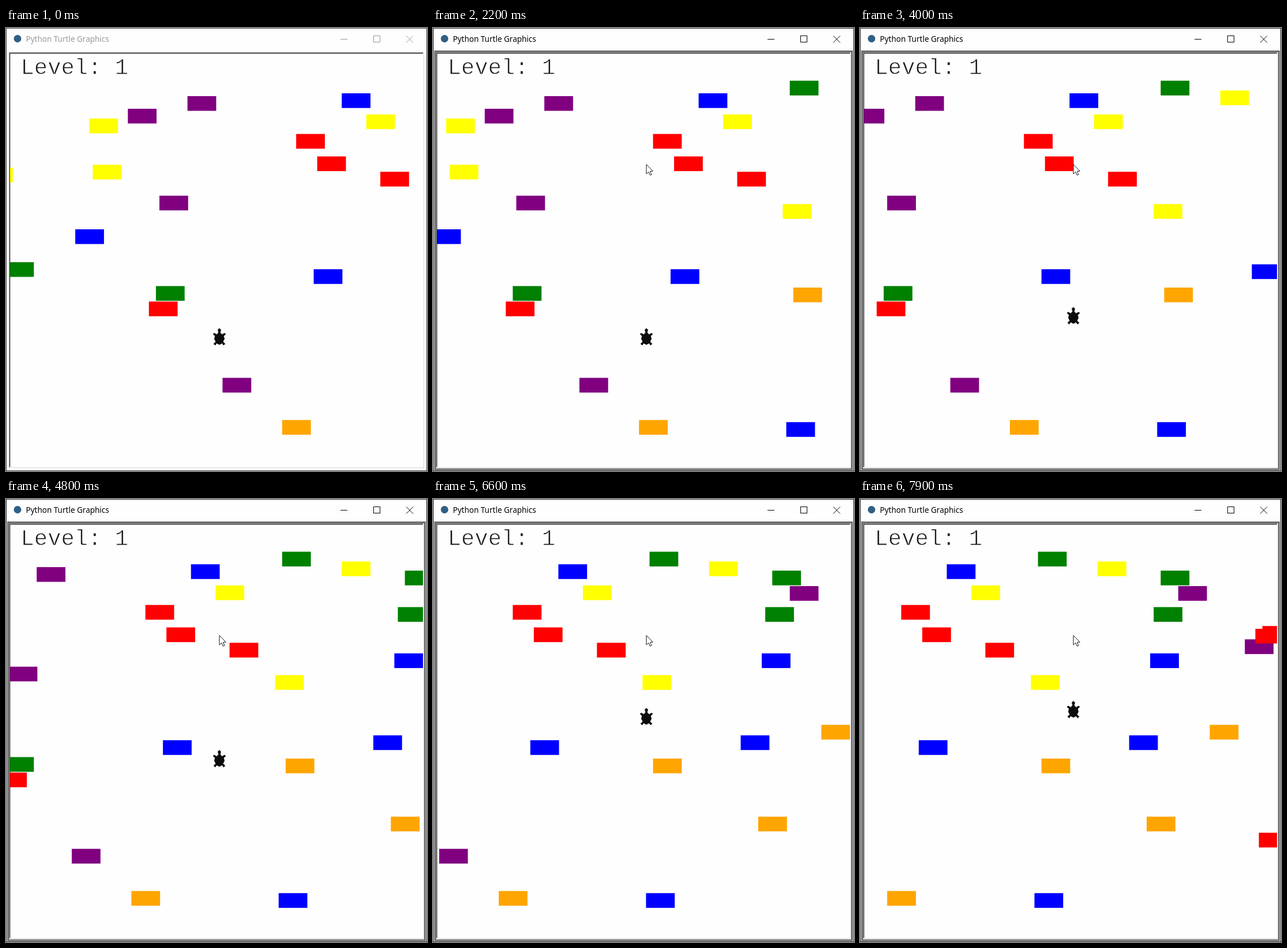
Write an HTML page with a canvas that moves like this. It is 730x768 px and loops after 8 s.

```html
<!DOCTYPE html>
<html lang="en">
<head>
<meta charset="utf-8">
<title>Turtle Crossing</title>
<style>
html, body { margin: 0; width: 100%; height: 100%; overflow: hidden; background: #fff; }
canvas { display: block; }
</style>
</head>
<body>
<canvas id="stage" width="730" height="768"></canvas>
<script>
const ctx = document.getElementById('stage').getContext('2d');

const LOOP = 8000, TICK = 100;
const UNIT = 1.216;               // screen pixels per turtle unit
const STEP = 5 * UNIT, HOP = 10 * UNIT;
const CAR_W = 49.8, CAR_H = 25.5, CAR_START = 697.7;
const FOCUS_TICK = 11;
const IDLE_TICKS = [2, 13, 23, 34, 45, 56, 67, 78];
const HOP_STEPS = [31, 33, 35, 37, 39, 41, 43, 45, 47, 49, 52, 55, 58, 64];

// Colour, step of entry, top edge
const CARS = [
  ['yellow', -121, 242], ['green', -115, 406], ['blue', -95, 349],
  ['yellow', -91, 157], ['yellow', -90, 237], ['purple', -80, 140],
  ['red', -74, 474.2], ['green', -72, 447.4], ['purple', -71, 290.7],
  ['purple', -63, 118.1], ['purple', -53, 606.5], ['orange', -36, 679.6],
  ['red', -32, 183.7], ['blue', -27, 418.2], ['red', -26, 222.6],
  ['blue', -19, 113.2], ['yellow', -12, 149.8], ['red', -8, 249.3],
  ['yellow', 5, 305.3], ['blue', 6, 683.3], ['green', 7, 91.4],
  ['orange', 8, 450], ['yellow', 24, 108.3], ['blue', 33, 409.7],
  ['orange', 38, 550.7], ['blue', 39, 267.6], ['green', 40, 187.4],
  ['green', 42, 124.2], ['purple', 47, 151], ['orange', 56, 391.5],
  ['purple', 66, 243.3], ['red', 69, 225], ['red', 70, 578.6], ['red', 71, 220.2]
];

// Right half of the turtle, head to tail
const HALF = [[0, 16], [2, 14], [1, 10], [4, 7], [7, 9], [9, 8], [6, 5],
  [7, 1], [5, -3], [8, -6], [6, -8], [4, -5], [0, -7]];
const SHELL = HALF.concat(HALF.slice(1, -1).reverse().map(([x, y]) => [-x, y]));
const ARROW = [[0, 0], [0, 16.5], [3.8, 13], [6.4, 18.7], [9, 17.5], [6.5, 12], [11.3, 11.6]];

function rect(color, x, y, w, h) {
  ctx.fillStyle = color;
  ctx.fillRect(x, y, w, h);
}

function frame(color, width, x, y, w, h) {
  ctx.strokeStyle = color;
  ctx.lineWidth = width;
  ctx.strokeRect(x, y, w, h);
}

function polygon(points, x, y, fill, line) {
  ctx.beginPath();
  points.forEach(([px, py]) => ctx.lineTo(x + px, y + py));
  ctx.closePath();
  ctx.fillStyle = fill;
  ctx.fill();
  ctx.strokeStyle = line;
  ctx.lineWidth = 1;
  ctx.stroke();
}

function drawTitleBar(active) {
  const ink = active ? '#000' : '#999';
  ctx.fillStyle = '#2f5f85';
  ctx.beginPath();
  ctx.arc(20, 18.5, 6.5, 0, Math.PI * 2);
  ctx.fill();

  ctx.fillStyle = ink;
  ctx.font = '13.5px "Segoe UI", "Open Sans", sans-serif';
  ctx.fillText('Python Turtle Graphics', 34.5, 24);

  rect(ink, 580, 19, 12, 1);
  frame(ink, 1, 637.5, 13.5, 11, 11);
  ctx.beginPath();
  ctx.moveTo(694, 13.5);
  ctx.lineTo(706, 25.5);
  ctx.moveTo(706, 13.5);
  ctx.lineTo(694, 25.5);
  ctx.stroke();
}

function drawFrame(active) {
  rect('#fefefe', 0, 0, 730, 768);
  frame(active ? '#2b2b2b' : '#444', 1, 0.5, 0.5, 729, 767);
  if (active) frame('#6c6c6c', 3, 3.5, 40.5, 723, 724.5);
  rect('#a0a0a0', 5, 42, 719, 1);
  rect('#a0a0a0', 5, 42, 1, 720);
  rect('#3c3c3c', 6, 43, 717, 1.5);
  rect('#3c3c3c', 6, 43, 1.3, 718);
  rect('#e3e3e3', 723.5, 43, 1.5, 720);
  rect('#e3e3e3', 6, 761.5, 719, 1.5);
}

function drawCars(step) {
  ctx.save();
  ctx.beginPath();
  ctx.rect(7, 44, 716, 717);
  ctx.clip();
  for (const [color, entry, y] of CARS) {
    if (step < entry - 1) continue;
    rect(color, CAR_START - STEP * (step - entry), y, CAR_W, CAR_H);
  }
  ctx.restore();
}

function drawLevel() {
  ctx.font = '38.9px "Courier New", "Liberation Mono", monospace';
  ctx.fillStyle = '#1c1c1c';
  ctx.fillText('Level: 1', 25.5, 80);
  // A pale outline thins the letters
  ctx.strokeStyle = '#fefefe';
  ctx.lineWidth = 0.9;
  ctx.strokeText('Level: 1', 25.5, 80);
}

function drawTurtle(step, tick) {
  const hops = HOP_STEPS.filter(s => s <= step).length;
  const color = tick >= FOCUS_TICK && tick < 14 ? '#000' : '#0c0c0c';
  const points = SHELL.map(([x, y]) => [x * UNIT, -y * UNIT]);
  polygon(points, 370, 540.2 - HOP * hops, color, color);
}

function drawPointer(tick) {
  if (tick < 7) return;
  const k = Math.min(1, (tick - 6) / 4);
  polygon(ARROW, 410 - 40 * k, 236.5 * k, '#fff', '#111');
}

function draw(time) {
  const tick = Math.floor((time % LOOP) / TICK);
  const step = tick - IDLE_TICKS.filter(n => n <= tick).length;
  const active = tick >= FOCUS_TICK;
  drawFrame(active);
  drawTitleBar(active);
  drawCars(step);
  drawLevel();
  drawTurtle(step, tick);
  drawPointer(tick);
}

const start = performance.now();
function loop() {
  draw(performance.now() - start);
  requestAnimationFrame(loop);
}
loop();
</script>
</body>
</html>
```
